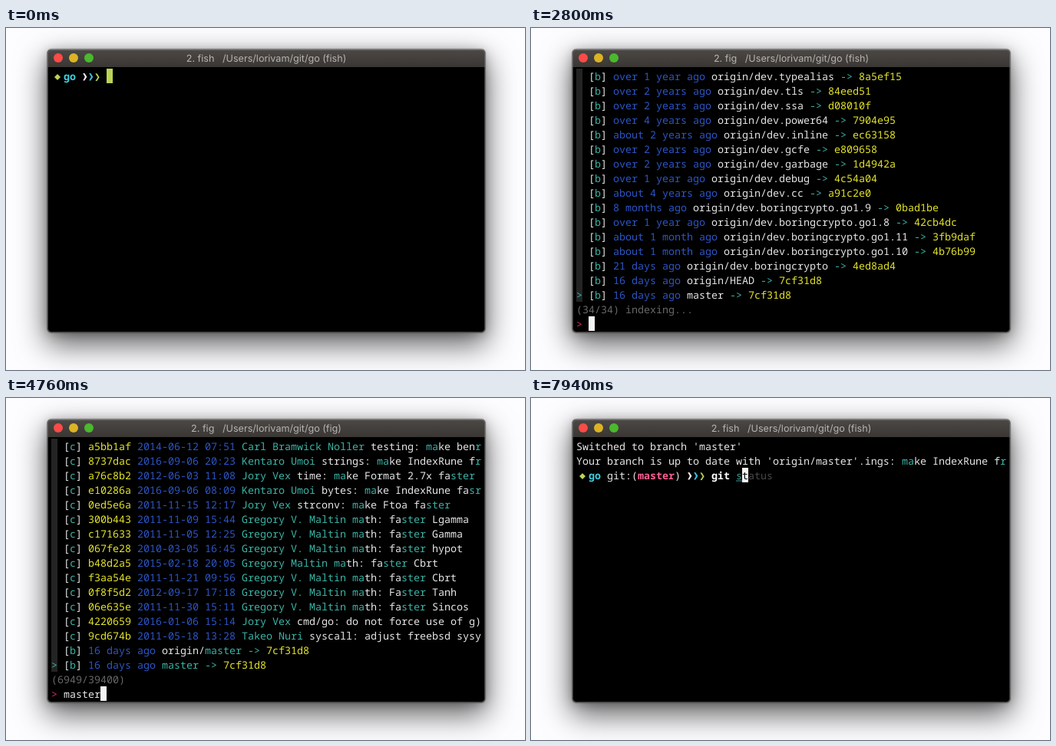
An HTML page that plays this animation: 676 by 446 pixels, repeating every 8000 ms.

```html
<!DOCTYPE html>
<html lang="en">
<head>
<meta charset="utf-8">
<title>Terminal</title>
<style>
html, body { margin: 0; width: 100%; height: 100%; overflow: hidden; background: #fdfcfe; }
#window {
  position: absolute; left: 54px; top: 28px; width: 570px; height: 369px; border-radius: 5px;
  box-shadow: 0 0 1px 1px rgba(70, 70, 70, .6), 0 14px 38px 2px rgba(0, 0, 0, .62), 0 2px 14px rgba(0, 0, 0, .25);
}
svg { position: absolute; left: 0; top: 0; display: block; }
text { white-space: pre; text-rendering: geometricPrecision; }
#screen text { font: 13.333px "Noto Sans Mono", "DejaVu Sans Mono", monospace; font-variant-ligatures: none; }
#screen text.bold { font-weight: 700; }
#title { font: 12.6px Inter, Roboto, sans-serif; fill: #b7b4b2; text-anchor: middle; }
</style>
</head>
<body>
<div id="window"></div>
<svg width="676" height="446" viewBox="0 0 676 446">
  <defs>
    <linearGradient id="bar" x2="0" y2="1">
      <stop stop-color="#4c4845"/><stop offset="1" stop-color="#393633"/>
    </linearGradient>
  </defs>
  <rect x="54" y="28" width="570" height="369" rx="5"/>
  <path d="M54 51V33a5 5 0 0 1 5-5H619a5 5 0 0 1 5 5V51Z" fill="url(#bar)"/>
  <path d="M57 28.5H621" stroke="#696663"/>
  <rect x="54.5" y="28.5" width="569" height="368" rx="5" fill="none" stroke="#7a7a78" stroke-opacity=".55"/>
  <circle cx="68" cy="39" r="6" fill="#fb4b47"/>
  <circle cx="88" cy="39" r="6" fill="#dcb324"/>
  <circle cx="108" cy="39" r="6" fill="#4ab92d"/>
  <text id="title" x="339" y="44"></text>
  <g id="screen"></g>
</svg>
<script>
const LOOP = 8000, CELL = 8, LINE = 19, LEFT = 59, TOP = 53;
const GREEN = '#b9d455', WHITE = '#f4f4f4';

// Style codes: "~x" inside a line switches to style x; capitals are bold.
const COLORS = {
  w: '#e6e6e6', W: '#ffffff', t: '#3bb3a5', a: '#3d9c98', u: '#3d9c98', b: '#2d55c4', y: '#e3e32c',
  r: '#d8305c', R: '#d8305c', d: '#686868', s: '#484848', C: '#3fd0e2', P: '#ff5f92',
  g: GREEN, c: '#3bb9d8', f: '#f6e8ee', k: '#000000'
};

const esc = s => s.replace(/&/g, '&amp;').replace(/</g, '&lt;').replace(/>/g, '&gt;');
const colX = col => LEFT + col * CELL;
const rowY = row => TOP + row * LINE;
const rect = (x, y, w, h, fill) => `<rect x="${x}" y="${y}" width="${w}" height="${h}" fill="${fill}"/>`;

function run(text, style, col, row) {
  const x = colX(col), y = rowY(row), color = COLORS[style];
  if (text === '◆') return `<path d="M${x + 4} ${y + 7}l4 4-4 4-4-4z" fill="${color}"/>`;
  if (text === '❯') return `<path d="M${x + 1.2} ${y + 6}h2.2l3 4.7-3 4.7h-2.2l2.6-4.7z" fill="${color}"/>`;
  const bold = /[A-Z]/.test(style) ? ' class="bold"' : '';
  const underline = style === 'u' ? rect(x, y + 16.5, text.length * CELL, 1, color) : '';
  return `<text x="${x}" y="${y + 15}" fill="${color}"${bold}>${esc(text)}</text>${underline}`;
}

function drawLine(line, row) {
  let col = 0, style = 'w', out = '';
  line.split(/(~\w)/).forEach(part => {
    if (/^~\w$/.test(part)) { style = part[1]; return; }
    if (part.trim()) out += run(part, style, col, row);
    col += part.length;
  });
  return out;
}

function drawCursor({ col, row, color = WHITE, char = '' }) {
  return rect(colX(col), rowY(row), CELL, LINE, color) + (char.trim() ? run(char, 'k', col, row) : '');
}

// Fuzzy finder rows
const branchRow = (when, name, hash) => `  [~tb~w] ~b${when} ~w${name} ~t-> ~y${hash}`;

const branches = `over 1 year ago|dev.typealias|8a5ef15
over 2 years ago|dev.tls|84eed51
over 2 years ago|dev.ssa|d08010f
over 4 years ago|dev.power64|7904e95
about 2 years ago|dev.inline|ec63158
over 2 years ago|dev.gcfe|e809658
over 2 years ago|dev.garbage|1d4942a
over 1 year ago|dev.debug|4c54a04
about 4 years ago|dev.cc|a91c2e0
8 months ago|dev.boringcrypto.go1.9|0bad1be
over 1 year ago|dev.boringcrypto.go1.8|42cb4dc
about 1 month ago|dev.boringcrypto.go1.11|3fb9daf
about 1 month ago|dev.boringcrypto.go1.10|4b76b99
21 days ago|dev.boringcrypto|4ed8ad4
16 days ago|HEAD|7cf31d8`.split('\n').map(line => {
  const [when, name, hash] = line.split('|');
  return branchRow(when, 'origin/' + name, hash);
}).concat(branchRow('16 days ago', 'master', '7cf31d8'));

const commitRows = (list, match) => list.split('\n').map(line => {
  const [head, name, message] = line.split('|');
  const marked = message.replace(match, '~t$&~w');
  return `  [~tc~w] ~y${head.slice(0, 7)} ~b${head.slice(8)} ~t${name} ~w${marked}`;
});

const matchesM = commitRows(`9c2ade3 2008-08-08 17:13|Dan Harlowen|mp constants
90846cd 2008-06-24 11:10|Dan Harlowen|map[int] bug
5f0a5e7 2008-09-24 14:12|Dan Harlowen|more export
3cd10e3 2011-01-04 13:40|Jory Vex|merge tree
c683986 2009-08-06 14:21|Lem Tarn|mandelbrot
b6f5935 2008-09-29 20:33|Dan Harlowen|minor bugs
a7f1af8 2008-09-01 14:37|Dan Harlowen|minor bugs
777ee71 2008-07-21 16:18|Lem Tarn|map delete
f9c58c2 2008-06-08 19:02|Dan Harlowen|more nihan
2117ad1 2009-08-06 10:53|Gerald Wolmender|minor fix
dfc3910 2009-03-05 13:31|Jory Vex|math: doc
8a7eb77 2009-03-05 13:35|Jory Vex|misc doc
eed3add 2009-01-07 15:54|Dan Harlowen|more
dee07c8 2008-06-22 21:02|Dan Harlowen|maps
4e8142c 2008-06-16 22:34|Dan Harlowen|maps`, /m/);
matchesM.splice(12, 0, branchRow('16 days ago', '~tm~waster', '7cf31d8'));

const matchesMaster = commitRows(`a5bb1af 2014-06-12 07:51|Carl Bramwick Noller|testing: make benr
8737dac 2016-09-06 20:23|Kentaro Umoi|strings: make IndexRune fr
a76c8b2 2012-06-03 11:08|Jory Vex|time: make Format 2.7x faster
e10286a 2016-09-06 08:09|Kentaro Umoi|bytes: make IndexRune fasr
0ed5e6a 2011-11-15 12:17|Jory Vex|strconv: make Ftoa faster
300b443 2011-11-09 15:44|Gregory V. Maltin|math: faster Lgamma
c171633 2011-11-05 12:25|Gregory V. Maltin|math: faster Gamma
067fe28 2010-03-05 16:45|Gregory V. Maltin|math: faster hypot
b48d2a5 2015-02-18 20:05|Gregory Maltin|math: faster Cbrt
f3aa54e 2011-11-21 09:56|Gregory V. Maltin|math: faster Cbrt
0f8f5d2 2012-09-17 17:18|Gregory V. Maltin|math: Faster Tanh
06e635e 2011-11-30 15:11|Gregory V. Maltin|math: faster Sincos
4220659 2016-01-06 15:14|Jory Vex|cmd/go: do not force use of g)
9cd674b 2011-05-18 13:28|Takeo Nuri|syscall: adjust freebsd sysy`, /ma(?=ke|th)|ster|s?r$/g).concat(
  branchRow('16 days ago', 'origin/~tmaster', '7cf31d8'),
  branchRow('16 days ago', '~tmaster', '7cf31d8'));

function finder(rows, status, query, owner) {
  const lines = rows.slice();
  lines[15] = '~t>~w' + lines[15].slice(1);
  lines.push(`~d${status}`, `~r> ~w${query}`);
  return { app: 'fig', owner, lines, gutter: true, cursor: { col: 2 + query.length, row: 17 } };
}

// Shell
const prompt = (git = '') => `~g◆ ~Cgo ${git}~f❯~c❯~g❯ `;
const width = line => line.replace(/~\w/g, '').length;
const typedCount = (t, start, text) => Math.max(0, Math.min(text.length, Math.floor((t - start) / 90) + 1));

function shell(before, head, command, count, hideCursor) {
  const typed = command.slice(0, count), rest = count ? command.slice(count) : '';
  const [name] = command.split(' ');
  const verb = typed.slice(0, name.length), args = typed.slice(name.length + 1);
  const argStyle = args.length === 1 ? 'u' : 'a';
  const gap = typed.length > name.length ? ' ' : '';
  const input = `~${verb === name ? 'W' : 'R'}${verb}${gap}~${argStyle}${args}~s${rest}`;
  const cursor = hideCursor ? null : {
    col: width(head) + count, row: before.length, color: count ? WHITE : GREEN, char: rest[0]
  };
  return { app: 'fish', owner: 'fish', lines: [...before, head + input], cursor };
}

const statusOutput = [
  prompt() + '~Wgit ~astatus',
  '~rHEAD detached at ~worigin/master',
  'nothing to commit, working tree clean'
];
const switched = [
  "Switched to branch 'master'",
  "Your branch is up to date with 'origin/master'.ings: ~tma~wke IndexRune f~tr"
];
const masterPrompt = prompt('~wgit:(~Pmaster~w) ');
const QUERY = 'master', TOTAL = 39400;
const queryTimes = [4300, 4490, 4580, 4640, 4680, 4750];
const hits = [31103, 22814, 14062, 9127, 7301, 6949];

function stateAt(t) {
  if (t < 1400) return shell([], prompt(), 'git status', typedCount(t, 280, 'git status'));
  if (t < 2520) return shell(statusOutput, prompt(), 'fig', typedCount(t, 1860, 'fig'));
  if (t < 4300) {
    const progress = Math.max(0, Math.min(1, (t - 2880) / 1100));
    const count = Math.round(34 + (TOTAL - 34) * progress);
    const status = `(${count}/${count})${progress < 1 ? ' indexing...' : ''}`;
    return finder(branches, status, '', t < 2900 ? 'fish' : 'fig');
  }
  if (t < 5500) {
    const n = queryTimes.filter(time => time <= t).length;
    return finder(n < 3 ? matchesM : matchesMaster, `(${hits[n - 1]}/${TOTAL})`, QUERY.slice(0, n), 'fig');
  }
  if (t < 5700) return { app: 'fig', owner: 'fig', lines: switched, cursor: { col: 0, row: 2 } };
  return shell(switched, masterPrompt, 'git status', typedCount(t, 7560, 'git status'), t >= 6300 && t < 6820);
}

const title = document.getElementById('title'), screen = document.getElementById('screen');
let shown = '';

function render(t) {
  const { app, owner, lines, gutter, cursor } = stateAt(t);
  const caption = `2. ${app}   /Users/lorivam/git/go (${owner})`;
  const markup = (gutter ? rect(LEFT, TOP, CELL, 16 * LINE, '#242424') : '')
    + lines.map(drawLine).join('') + (cursor ? drawCursor(cursor) : '');
  if (caption + markup === shown) return;
  shown = caption + markup;
  title.textContent = caption;
  screen.innerHTML = markup;
}

const began = performance.now();
function tick() {
  render((performance.now() - began) % LOOP);
  requestAnimationFrame(tick);
}
tick();
</script>
</body>
</html>
```
